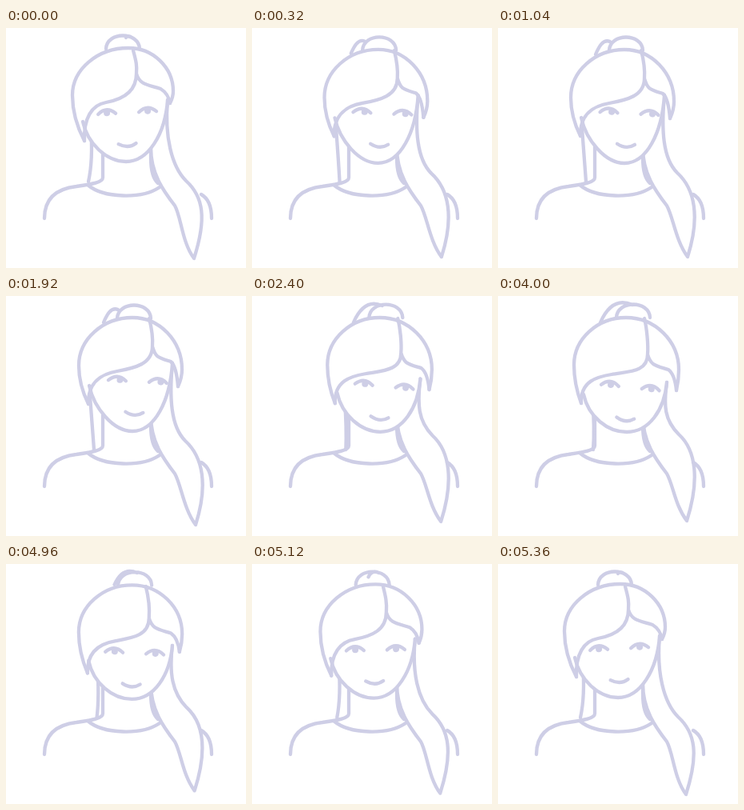
These frames come from a looping animation (300 by 300 pixels, 5.76 s). An HTML page:

```html
<!DOCTYPE html>
<html lang="en">
<head>
<meta charset="utf-8">
<title>Head turn</title>
<style>
  html, body { margin: 0; width: 100%; height: 100%; overflow: hidden; background: #fff; }
  svg { display: block; width: 100%; height: 100%; }
  path { fill: none; stroke: #cecee6; stroke-width: 4.3; stroke-linecap: round; stroke-linejoin: round; }
  #jaw { fill: #fff; }
  .pupil { stroke-width: 8; }
</style>
</head>
<body>
<svg viewBox="0 0 300 300">
  <path d="M48 238C48 214 62 201 88 198C108 195 121 193 121 187V145"/>
  <path d="M102 196C122 213 170 214 192 199"/>
  <path d="M244 208C253 213 257 224 257 238"/>
  <path d="M181 145V162C181 178 184 189 190 194"/>
  <path id="lock"/>
  <path id="tail"/>
  <path id="jaw"/>
  <path id="crown"/>
  <path id="fringe"/>
  <path id="bun"/>
  <g id="face">
    <g transform="translate(-25.5 0)"><path class="lid"/><path class="pupil"/></g>
    <g transform="translate(25.5 0)"><path class="lid"/><path class="pupil"/></g>
    <path d="M-13 40.5Q-1 47.5 9 40.5"/>
  </g>
</svg>
<script>
const LOOP = 5760, STEP = 80, BLINK_AT = 3920, DRIFT_LENGTH = 1920;

// Key points of the head: facing front, turned, tilted.
const landmarks = {
  left:    [[83, 84],   [91, 87],   [95, 86]],
  top:     [[153, 25],  [158, 27],  [160, 27]],
  right:   [[209, 79],  [220, 92],  [226, 92]],
  tipL:    [[98, 141],  [103, 135], [104, 134]],
  tipR:    [[205, 94],  [215, 113], [223, 118]],
  part:    [[163, 57],  [183, 63],  [187, 73]],
  fringe:  [[125, 93],  [139, 94],  [142, 98]],
  bun:     [[146, 25],  [160, 27],  [169, 26]],
  bunBack: [[150, 12],  [122, 33],  [128, 33]],
  bunJoin: [[156, 11],  [140, 17],  [168, 11]],
  jawL:    [[96, 117],  [104, 112], [107, 123]],
  chin:    [[150, 167], [158, 169], [161, 170]],
  jawR:    [[202, 90],  [208, 84],  [211, 108]],
  tailMid: [[225, 191], [224, 181], [226, 173]],
  tailTip: [[235, 288], [237, 286], [236, 281]],
  face:    [[151.5, 104], [164.5, 105], [165.5, 112.5]],
  look:    [[-3, 0],    [3, 3.5],   [6, 1]],        // tilt in degrees, pupil shift
  lock:    [[106, 103], [105, 110], [118, 119]]     // x at top and bottom
};

const moves = [
  { from: 0, to: 1, start: 0, length: 640, power: 4, drift: 0.07 },
  { from: 1, to: 2, start: 2160, length: 560, power: 3, drift: 0 },
  { from: 2, to: 0, start: 4880, length: 480, power: 2.3, drift: 0 }
];

const mix = (a, b, k) => a + (b - a) * k;
const by = ([x, y], dx, dy) => [x + dx, y + dy];
const from = p => `M${p}`;
const bend = (c, end) => `Q${c} ${end}`;
const curve = (c1, c2, end) => `C${c1} ${c2} ${end}`;
const setPath = (id, ...pieces) => document.getElementById(id).setAttribute('d', pieces.join(''));
const lids = document.querySelectorAll('.lid');
const pupils = document.querySelectorAll('.pupil');

function drawHair(p) {
  const { left, top, right, tipL, tipR, part, fringe, bun, bunBack, bunJoin } = p;
  const round = 0.55;
  setPath('crown',
    from(tipL), bend([left[0], mix(left[1], tipL[1], 0.5)], left),
    curve([left[0], mix(left[1], top[1], round)], [mix(top[0], left[0], round), top[1]], top),
    curve([mix(top[0], right[0], round), top[1]], [right[0], mix(right[1], top[1], round)], right),
    bend([right[0], mix(right[1], tipR[1], 0.5)], tipR));

  const partTop = [part[0] - 4, 28];
  const side = [mix(part[0], tipR[0], 0.72), part[1] + 19];
  setPath('fringe',
    from(partTop), curve(by(partTop, 3, 12), by(part, 1, -12), part),
    curve(by(part, 0, 22), by(fringe, 22, -4), fringe),
    curve(by(fringe, -18, 3), by(tipL, -1, -28), tipL),
    from(part), curve(by(part, 4, 14), by(side, -16, -5), side),
    bend([tipR[0] - 2, side[1] + 6], tipR));

  const reach = bunJoin[0] - bunBack[0];
  setPath('bun',
    from(by(bun, -21, 1)), curve(by(bun, -20, -21), by(bun, 20, -21), by(bun, 21, 1)),
    from(bunBack),
    curve(by(bunBack, reach * 0.2, -reach * 0.45), by(bunJoin, -reach * 0.5, -reach * 0.22), bunJoin));

  setPath('lock', from([p.lock[0], 125]), bend([p.lock[0] + 3, 165], [p.lock[1], 192]));
}

function drawTail({ jawR, tailMid, tailTip }) {
  const inner = [211, 222];
  setPath('tail',
    from(jawR),
    curve([jawR[0] - 4, mix(jawR[1], tailMid[1], 0.45)], by(tailMid, -18, -18), tailMid),
    curve(by(tailMid, 22, 20), by(tailTip, 16, -50), tailTip),
    curve(by(tailTip, -15, -20), by(inner, 8, 14), inner),
    curve(by(inner, -14, -18), [181, 182], [181, 150]));
}

function drawFace({ jawL, chin, jawR, face, look }, blinking) {
  setPath('jaw',
    from(jawL), curve(by(jawL, 6, 28), by(chin, -24, 0), chin),
    curve(by(chin, 28, 0), [jawR[0] - 3, mix(jawR[1], chin[1], 0.55)], jawR));

  const [tilt, gaze] = look;
  document.getElementById('face').setAttribute('transform', `translate(${face}) rotate(${tilt})`);
  lids.forEach(lid => lid.setAttribute('d', `M-11 2Q0 ${blinking ? 8 : -8} 11 2`));
  pupils.forEach(pupil => {
    pupil.setAttribute('d', `M${gaze} 1h0.01`);
    pupil.style.display = blinking ? 'none' : '';
  });
}

function draw(now) {
  const time = Math.floor((now % LOOP) / STEP) * STEP;
  const move = moves.filter(m => time >= m.start).pop();
  const elapsed = time - move.start;
  const eased = 1 - (1 - Math.min(1, elapsed / move.length)) ** move.power;
  const drifting = mix(eased, Math.min(1, elapsed / DRIFT_LENGTH), move.drift);

  const pose = {};
  for (const [name, points] of Object.entries(landmarks)) {
    const k = name === 'face' ? drifting : eased;
    pose[name] = points[move.from].map((v, i) => mix(v, points[move.to][i], k));
  }
  drawHair(pose);
  drawTail(pose);
  drawFace(pose, time === BLINK_AT);
}

const begin = performance.now();
function frame() {
  draw(performance.now() - begin);
  requestAnimationFrame(frame);
}
frame();
</script>
</body>
</html>
```
